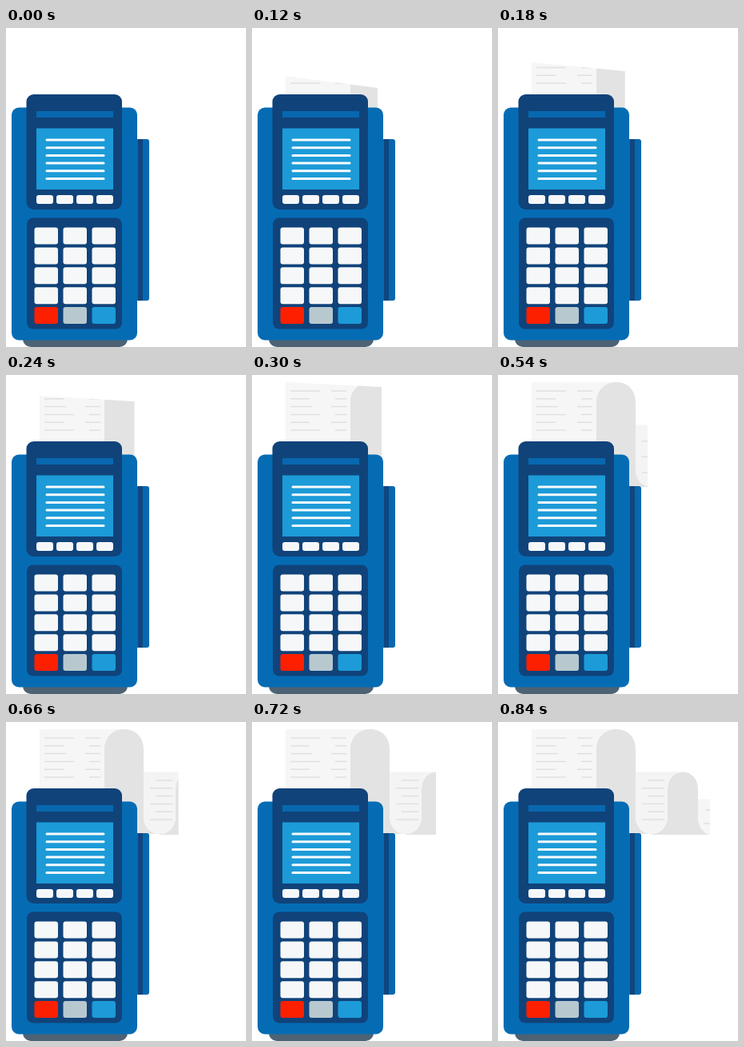
These frames come from a looping animation (300 px wide and 399 px high, 1680 ms). An HTML page:

```html
<!DOCTYPE html>
<html lang="en">
<head>
<meta charset="utf-8">
<title>Card terminal printing a receipt</title>
<style>
html, body { margin: 0; width: 100%; height: 100%; overflow: hidden; background: #fff; }
svg { display: block; width: 100%; height: 100%; }
</style>
</head>
<body>
<svg viewBox="0 0 300 399">
  <defs>
    <clipPath id="reveal"><polygon id="edge" points="0,0 0,0 0,0"/></clipPath>
  </defs>
  <g id="paper" clip-path="url(#reveal)">
    <path fill="#f6f6f6" d="M42 9H148V140H42Z"/>
    <path fill="#e3e3e3" d="M123 140V34C123 19 134 9 148 9C162 9 172 19 172 34V118C172 131 181 140 192 140Z"/>
    <path fill="#e3e3e3" d="M192 140C203 140 212 131 212 118V84C212 71 220 62.500 231 62.500C242 62.500 250 71 250 84V118C250 130 256 139 265 141H192Z"/>
    <path fill="#f4f4f4" d="M172 62.500H231C220 62.500 212 71 212 84V118C212 131 203 140 192 140C181 140 172 131 172 118Z"/>
    <path fill="#f6f6f6" d="M250 96.500H265V141C256 139 250 130 250 118Z"/>
    <g id="print" stroke="#e0e0e0" stroke-width="1.500" fill="none"/>
  </g>
  <rect x="21" y="378" width="131" height="21" rx="10" fill="#4d6274"/>
  <path fill="#10467f" d="M163 139H172V341H163Z"/>
  <path fill="#0868af" d="M171 139H176Q179 139 179 142V338Q179 341 176 341H171Z"/>
  <path fill="#0868af" d="M163 139H165V341H163Z"/>
  <rect x="7" y="99.500" width="157" height="291" rx="9" fill="#056cb4"/>
  <rect x="25.500" y="83" width="119.500" height="144" rx="9" fill="#10437a"/>
  <rect x="38" y="104" width="96" height="8" fill="#0868af"/>
  <rect x="38" y="125.500" width="96" height="76.500" fill="#1c9bd8"/>
  <rect x="26" y="237.500" width="119" height="139" rx="8" fill="#10437a"/>
  <g id="keys"></g>
</svg>
<script>
const NS = "http://www.w3.org/2000/svg";
const STEP = 60, LOOP = 1680, LAST = 14;
const $ = id => document.getElementById(id);

function add(parent, tag, attrs) {
  const el = document.createElementNS(NS, tag);
  for (const k in attrs) el.setAttribute(k, attrs[k]);
  parent.appendChild(el);
}

function key(x, y, w, h, fill) {
  add($("keys"), "rect", { x, y, width: w, height: h, rx: 3, fill });
}

function printLine(x1, x2, y) {
  add($("print"), "path", { d: `M${x1} ${y}H${x2}` });
}

// Screen text, function keys and keypad
for (let i = 0; i < 6; i++)
  add($("keys"), "path", {
    d: `M51 ${140 + i * 9.7}H122`, stroke: "#f7fbfd",
    "stroke-width": 3, "stroke-linecap": "round"
  });
for (let i = 0; i < 4; i++) key(38 + i * 25, 209, 21, 11, "#f5f7f8");
const lastRow = ["#fd2000", "#b7c8cf", "#1c9bd8"];
for (let r = 0; r < 5; r++)
  for (let c = 0; c < 3; c++)
    key(35.5 + c * 36, 249.5 + r * 24.9, 29.5, 21, r < 4 ? "#f5f7f8" : lastRow[c]);

// Receipt print
[85, 72, 75, 85, 72, 85].forEach((end, i) => {
  const y = 20 + i * 9.8;
  printLine(48, end, y);
  printLine(i % 2 ? 104 : 99, 118, y);
});
[187, 180, 187, 180, 187, 180].forEach((start, i) => printLine(start, 208, 73 + i * 9.8));
printLine(259, 265, 110);
printLine(257, 265, 127);

// Linear interpolation through [step, value] points
function track(points, n) {
  for (let i = 1; i < points.length; i++) {
    const [a, u] = points[i - 1], [b, v] = points[i];
    if (n <= b) return u + (v - u) * Math.max(0, n - a) / (b - a);
  }
  return points[points.length - 1][1];
}

const leftTop = [[1, 77], [2, 60], [4, 26], [5, 9], [6, 0]];
const rightTop = [[1, 96], [2, 75], [4, 33], [5, 15], [6, 0]];
const rightEdge = [[1, 156], [2, 157], [4, 160.5], [7, 165], [8, 174], [9, 187], [12, 230], [14, 265]];

function draw(ms) {
  const n = Math.min(LAST, Math.floor(ms % LOOP / STEP));
  $("paper").setAttribute("visibility", n ? "visible" : "hidden");
  const x = track(rightEdge, n), l = track(leftTop, n), r = track(rightTop, n);
  $("edge").setAttribute("points", `42,${l} ${x},${r} ${x},399 42,399`);
}

const start = performance.now();
function tick() {
  draw(performance.now() - start);
  requestAnimationFrame(tick);
}
tick();
</script>
</body>
</html>
```
